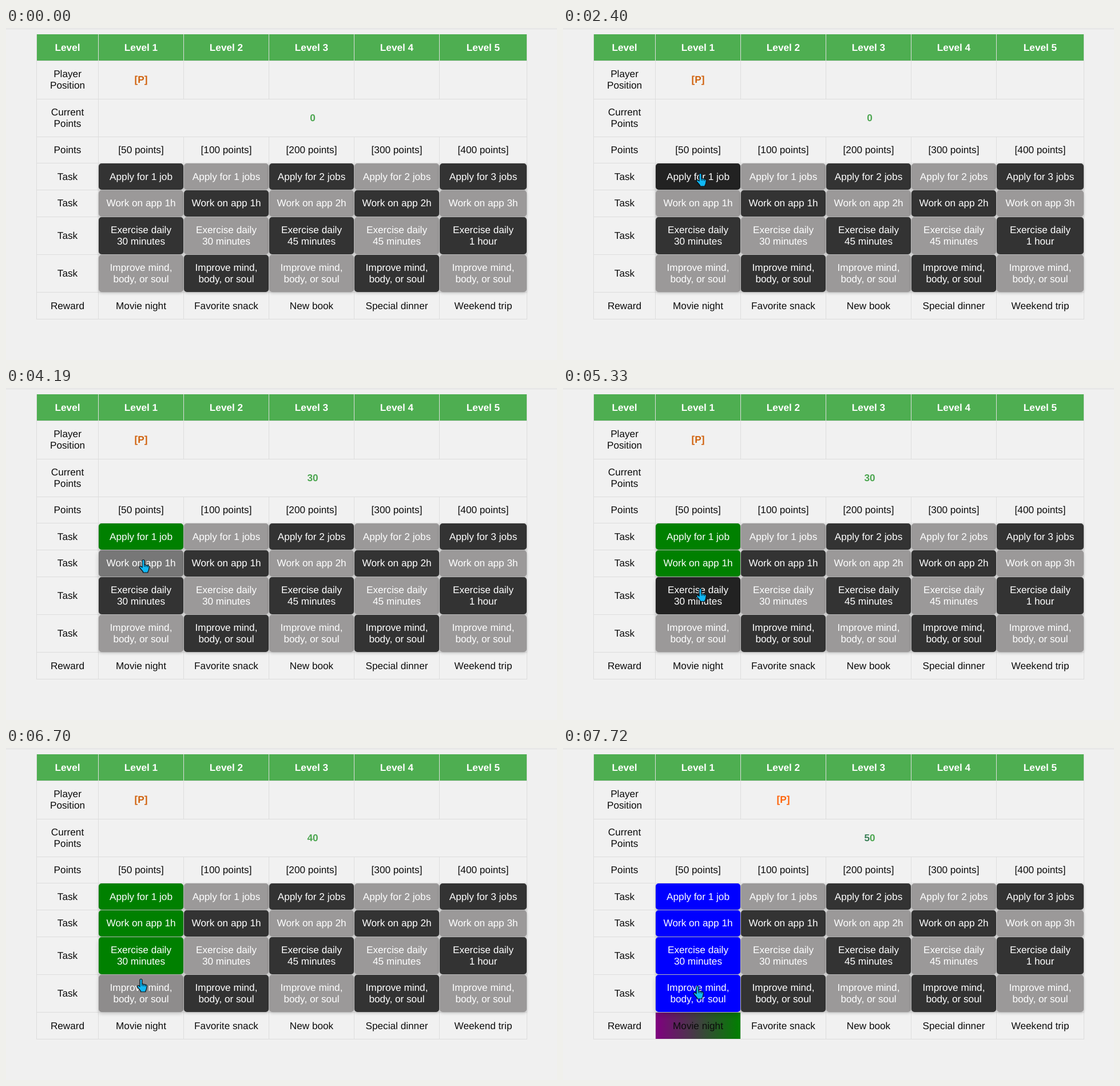
Animation, 963 px wide and 581 px high, one loop 8 s. Source, as an HTML page:

```html
<!DOCTYPE html>
<html lang="en">
<head>
<meta charset="utf-8">
<title>Level board</title>
<style>
  html, body { margin: 0; width: 100%; height: 100%; overflow: hidden; background: #f0f0f0; }
  #stage {
    position: absolute; left: 0; top: 0; width: 963px; height: 581px; overflow: hidden;
    font: 17.2px/20px "Liberation Sans", Arial, sans-serif; color: #0c0c0c;
    text-rendering: geometricPrecision;
  }
  #rule { position: absolute; top: 1px; width: 100%; height: 1px; background: #dcdcdc; }
  #grid { position: absolute; left: 53px; top: 11px; width: 858px; height: 499px; background: #ddd; }
  .cell { position: absolute; background: #f1f1f1; }
  .text { position: absolute; left: 0; width: 100%; text-align: center; white-space: pre; }
  .head { background: #4eae51; color: #fff; font-weight: bold; }
  .player { color: #d0610c; font-weight: bold; }
  .moved { color: #ff6308; }
  .score { color: #4ca650; font-weight: bold; }
  .score.won .text::first-letter { color: #3b8058; }
  .btn { color: #fff; border-radius: 5px; }
  #cursor { position: absolute; left: 0; top: 0; overflow: visible; }
  #cursor path { stroke: #0a0f14; stroke-width: 1.2; stroke-linejoin: round; fill: #10b8f4; }
  #cursor .crease { fill: none; stroke-width: 1; }
</style>
</head>
<body>
<div id="stage">
  <div id="rule"></div>
  <div id="grid"></div>
</div>
<script>
const LOOP = 8000, FADE = 300, STEP = 10, LINE = 20;
const stage = document.getElementById('stage');

// Grid lines, each one pixel thick, and the middle of the text in each row
const xs = [53, 161, 310, 459, 608, 757, 910];
const ys = [10, 57, 124, 190, 236, 283, 330, 396, 462, 509];
const mids = [34, 90, 157, 213, 260, 306, 363, 429, 486];

function addCell(row, col, text, cls = '', span = 1) {
  const el = document.createElement('div');
  const label = document.createElement('div');
  const x = xs[col] + 1, y = ys[row] + 1;
  const lines = text.split('\n').length;
  el.className = 'cell ' + cls;
  el.style.cssText = `left:${x}px;top:${y}px;width:${xs[col + span] - x}px;height:${ys[row + 1] - y}px`;
  label.className = 'text';
  label.style.top = mids[row] - lines * LINE / 2 - y + 'px';
  label.textContent = text;
  el.append(label);
  stage.append(el);
  return el;
}

const addRow = (row, texts, cls) => texts.map((text, i) => addCell(row, i + 1, text, cls));
const setText = (cell, text) => { cell.firstChild.textContent = text; };

['Level', 'Player\nPosition', 'Current\nPoints', 'Points', 'Task', 'Task', 'Task', 'Task', 'Reward']
  .forEach((text, row) => addCell(row, 0, text, row ? '' : 'head'));
addRow(0, [1, 2, 3, 4, 5].map(n => 'Level ' + n), 'head');
const spots = addRow(1, ['', '', '', '', ''], 'player');
spots[1].classList.add('moved');
const score = addCell(2, 1, '0', 'score', 5);
addRow(3, [50, 100, 200, 300, 400].map(n => `[${n} points]`));
const rewards = addRow(8, ['Movie night', 'Favorite snack', 'New book', 'Special dinner', 'Weekend trip']);

const tasks = [
  ['1 job', '1 jobs', '2 jobs', '2 jobs', '3 jobs'].map(s => 'Apply for ' + s),
  ['1h', '1h', '2h', '2h', '3h'].map(s => 'Work on app ' + s),
  ['30 minutes', '30 minutes', '45 minutes', '45 minutes', '1 hour'].map(s => 'Exercise daily\n' + s),
  Array(5).fill('Improve mind,\nbody, or soul')
];

const DARK = [51, 51, 51], DARK_HOVER = [34, 34, 34];
const GREY = [155, 153, 153], GREY_HOVER = [119, 119, 119];
const GREEN = [0, 128, 0], BLUE = [0, 0, 255];
const clicks = [2600, 4190, 5530, 6957];
const totals = [15, 30, 40, 50];
const levelUp = clicks[3], rewardFlip = 7720;

const buttons = [];
tasks.forEach((texts, r) => texts.forEach((text, c) => {
  const row = r + 4, col = c + 1;
  addCell(row, col, '');
  const dark = (r + c) % 2 === 0;
  buttons.push({
    row, col, text,
    base: dark ? DARK : GREY,
    over: dark ? DARK_HOVER : GREY_HOVER,
    done: c === 0 && r < 3 ? clicks[r] : Infinity,
    won: c === 0 ? levelUp : Infinity,
    hover: []
  });
}));
for (const b of buttons) b.el = addCell(b.row, b.col, b.text, 'btn');

stage.insertAdjacentHTML('beforeend', `
  <svg id="cursor" width="1" height="1">
    <path id="arrow" d="M.6.6V16.5L4.4 13 7 19 9.5 18 7 12.3H12.4Z"/>
    <g id="hand">
      <path d="M-2.5 13V1.5a2 2 0 0 1 4 0V8l6.5 1.5q2 .6 1.8 3L9 17q-.4 2-1.5 3.5V22H-1v-1.5L-6.5 14q-1.3-2 .5-3 1.5-.5 3.5 2z"/>
      <path class="crease" d="M1.5 7.5V12M4.3 8.6V12.2M7 9.3V12.6"/>
    </g>
  </svg>`);
const [cursor, arrow, hand] = ['cursor', 'arrow', 'hand'].map(id => document.getElementById(id));

const clamp = v => Math.min(1, Math.max(0, v));

// cubic-bezier(.25, .1, .25, 1)
function ease(p) {
  let lo = 0, hi = 1;
  for (let i = 0; i < 16; i++) {
    const u = (lo + hi) / 2, x = .75 * u * (1 - u) + u ** 3;
    if (x < p) lo = u; else hi = u;
  }
  const u = (lo + hi) / 2;
  return .3 * u * (1 - u) ** 2 + 3 * u * u * (1 - u) + u ** 3;
}
const smooth = p => p * p * (3 - 2 * p);
const fade = (t, start) => ease(clamp((t - start) / FADE));
const mix = (a, b, p) => a.map((v, i) => v + (b[i] - v) * p);

// Pointer moves: start, end, x, y
const moves = [
  [700, 1130, 346, 198], [1130, 1240, 345, 202],
  [1720, 2330, 240.5, 255], [3330, 3980, 240.5, 301],
  [4710, 5370, 240.5, 352], [6210, 6890, 235.5, 417]
];

function pointerAt(t) {
  let x = 835, y = 523;
  for (const [start, end, tx, ty] of moves) {
    const p = smooth(clamp((t - start) / (end - start)));
    x += (tx - x) * p;
    y += (ty - y) * p;
  }
  return { x, y, shown: t >= 700 };
}

const isOver = (b, p) => p.shown &&
  p.x > xs[b.col] && p.x <= xs[b.col + 1] && p.y > ys[b.row] && p.y <= ys[b.row + 1];

// Hover fade of every button along the pointer's path
for (const b of buttons) {
  let level = 0;
  for (let t = 0; t <= LOOP; t += STEP) {
    level = clamp(level + (isOver(b, pointerAt(t)) ? 1 : -1) * STEP / FADE);
    b.hover.push(level);
  }
}

function draw(t) {
  const p = pointerAt(t);
  let onButton = false;
  for (const b of buttons) {
    const h = ease(b.hover[Math.floor(t / STEP)]);
    let fill = mix(b.base, b.over, h);
    fill = mix(fill, GREEN, fade(t, b.done));
    fill = mix(fill, BLUE, fade(t, b.won));
    b.el.style.background = `rgb(${fill.map(Math.round)})`;
    b.el.style.boxShadow = `0 ${2 + 2 * h}px ${5 + 3 * h}px rgba(0,0,0,.2)`;
    onButton = onButton || isOver(b, p);
  }

  const count = clicks.filter(c => t >= c).length;
  const won = t >= levelUp;
  setText(score, count ? totals[count - 1] : 0);
  score.classList.toggle('won', won);
  setText(spots[0], won ? '' : '[P]');
  setText(spots[1], won ? '[P]' : '');
  rewards[0].style.background = won
    ? `linear-gradient(to ${t < rewardFlip ? 'right' : 'left'}, green, purple)` : '';

  cursor.style.display = p.shown ? '' : 'none';
  cursor.style.transform = `translate(${p.x}px, ${p.y}px)`;
  arrow.style.display = onButton ? 'none' : '';
  hand.style.display = onButton ? '' : 'none';
}

const begin = performance.now();
function tick() {
  draw((performance.now() - begin) % LOOP);
  requestAnimationFrame(tick);
}
tick();
</script>
</body>
</html>
```
